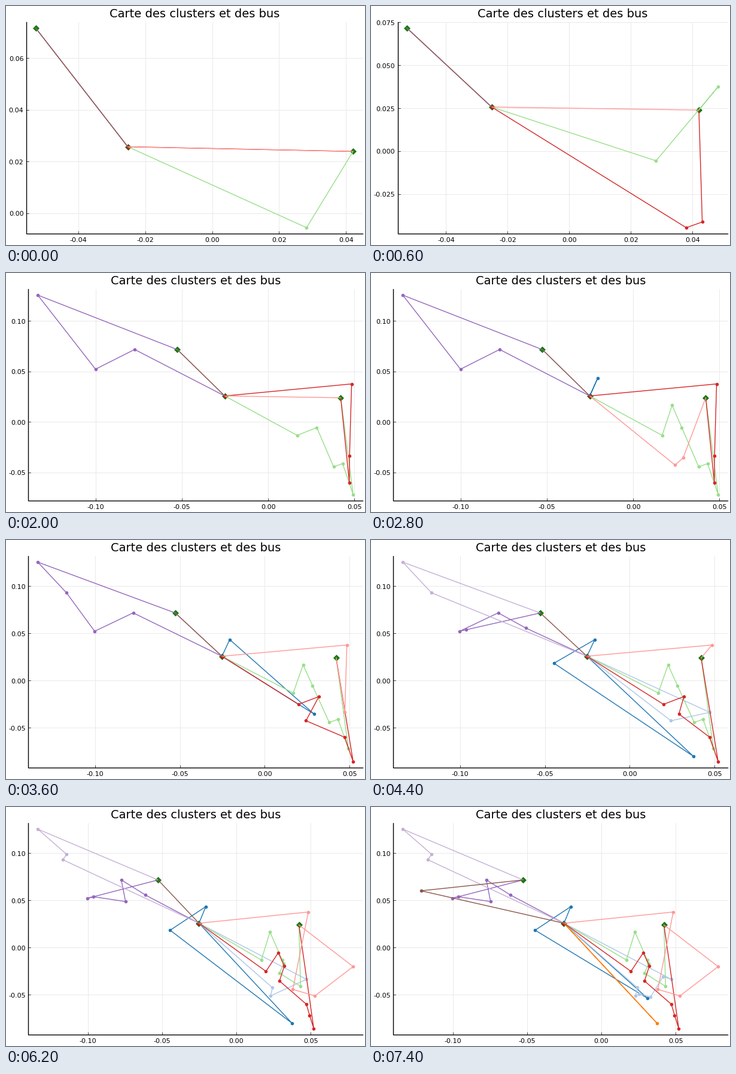
Recreate the animation shown at these times as a matplotlib script. Size 600 px wide and 400 px high, loop 8000 ms.

```python
import math
import matplotlib.pyplot as plt
from matplotlib.animation import FuncAnimation

W, H, DPI = 600, 400, 100
FRAMES, INTERVAL = 40, 200
TOP, BOTTOM, RIGHT = 27, 381, 596
PT = 72 / DPI

# A and B are depots, S is the school, the rest are bus stops.
PLACES = {
    "A": (-.0527, .0716), "S": (-.0252, .0257), "B": (.0421, .0239),
    "C": (.0282, -.0056), "D": (.0484, .0376), "E": (.0380, -.0445),
    "F": (.0432, -.0412), "G": (-.1337, .1255), "H": (-.0775, .0717),
    "I": (.0471, -.0602), "J": (-.1002, .0522), "K": (-.0206, .0433),
    "L": (.0168, -.0133), "M": (.0226, .0165), "N": (.0243, -.0427),
    "O": (.0290, -.0355), "P": (.0472, -.0338), "Q": (.0493, -.0720),
    "R": (.0199, -.0253), "T": (.0319, -.0171), "U": (.0521, -.0861),
    "V": (-.1168, .0930), "W": (-.1143, .0988), "X": (-.0963, .0538),
    "Y": (-.0611, .0555), "Z": (-.0446, .0183), "a": (.0375, -.0804),
    "b": (.0308, -.0133), "c": (.0290, -.0272), "d": (-.0746, .0487),
    "e": (-.1214, .0601), "f": (.0310, -.0538), "g": (.0415, -.0309),
    "h": (.0331, -.0525), "i": (.0255, -.0494), "j": (.0230, -.0513),
    "k": (.0323, -.0196), "l": (.0529, -.0513), "m": (.0786, -.0203),
}

# Bus: colour, start, end.
BUSES = {
    "blue": ("#1f77b4", "S", "S"),
    "sky": ("#aec7e8", "S", "S"),
    "orange": ("#ff7f0e", "S", "S"),
    "green": ("#98df8a", "S", "B"),
    "red": ("#d62728", "S", "B"),
    "pink": ("#ff9896", "S", "B"),
    "purple": ("#9467bd", "A", "S"),
    "lilac": ("#c5b0d5", "A", "S"),
    "brown": ("#8c564b", "A", "S"),
}

# Routes that change when a new stop is added.
CHANGES = {
    0: dict(green="C"),
    1: dict(green="CD"),
    2: dict(red="E"),
    3: dict(red="EF"),
    4: dict(purple="H"),
    5: dict(red="EFI"),
    6: dict(purple="GH"),
    7: dict(green="LCD"),
    8: dict(purple="GJH"),
    9: dict(green="LCEF", red="DPI"),
    10: dict(green="LCEFQ"),
    11: dict(pink="N"),
    12: dict(blue="K"),
    13: dict(green="LMCEFQ"),
    14: dict(pink="NO"),
    15: dict(blue="KO", red="NIU", pink="DP"),
    16: dict(red="RNIU"),
    17: dict(red="RTNIU"),
    18: dict(purple="GVJH"),
    19: dict(purple="GVXJH"),
    20: dict(purple="XJHY", lilac="GV"),
    21: dict(blue="KZO"),
    22: dict(blue="KZa", sky="NP", red="RTOIU", pink="D"),
    23: dict(green="LMbTF", red="RCOIQU", pink="DE"),
    24: dict(green="LMbTcF"),
    25: dict(lilac="GWV"),
    27: dict(pink="DEl"),
    28: dict(purple="JXdHY"),
    29: dict(pink="DElm"),
    30: dict(sky="PjN"),
    31: dict(red="RCkOIQU"),
    32: dict(brown="e"),
    34: dict(sky="PijN"),
    35: dict(sky="PhijN"),
    36: dict(sky="PghijN"),
    37: dict(blue="KZf", orange="a"),
}

plt.rcParams["font.family"] = "DejaVu Sans"
fig = plt.figure(figsize=(W / DPI, H / DPI), dpi=DPI, facecolor="white")
ax = fig.add_axes([0, 0, 1, 1])


def routes_at(step):
    routes = dict.fromkeys(BUSES, "")
    for when, change in CHANGES.items():
        if when <= step:
            routes.update(change)
    return routes


def limits(values):
    low, high = min(values), max(values)
    pad = .03 * (high - low)
    return low - pad, high + pad


def ticks(low, high):
    span = high - low
    step = .02 if span < .11 else .025 if span < .17 else .05
    digits = 3 if step == .025 else 2
    first, last = math.ceil(low / step), math.floor(high / step)
    return [(k * step, f"{k * step:.{digits}f}") for k in range(first, last + 1)]


def line(xs, ys, color="black", px=1.4, **style):
    ax.plot(xs, ys, color=color, lw=px * PT, **style)


def marker(spot, shape, color, size, edge="none"):
    ax.plot(*spot, shape, color=color, ms=size * PT, mec=edge, mew=.5 * PT)


def draw(step):
    ax.cla()
    ax.set(xlim=(0, W), ylim=(H, 0))
    ax.axis("off")

    routes = routes_at(step)
    used = set("ASB" + "".join(routes.values()))
    x0, x1 = limits([PLACES[p][0] for p in used])
    y0, y1 = limits([PLACES[p][1] for p in used])
    x_ticks, y_ticks = ticks(x0, x1), ticks(y0, y1)

    # The left margin follows the widest label.
    widest = max((text for _, text in y_ticks), key=len)
    left = 33.8 + 3.5 * widest.startswith("-") + 7.2 * (len(widest.lstrip("-")) - 4)

    def px(x):
        return left + (x - x0) / (x1 - x0) * (RIGHT - left)

    def py(y):
        return BOTTOM - (y - y0) / (y1 - y0) * (BOTTOM - TOP)

    # Straight lines snap to whole pixels when drawn.
    for value, text in x_ticks:
        x = px(value)
        line([x, x], [TOP, BOTTOM], "#e9e9e9", 1)
        line([x, x], [BOTTOM - 4, BOTTOM], px=.7)
        ax.text(x, 395, text, size=8, ha="center", va="baseline")
    for value, text in y_ticks:
        y = py(value)
        line([left, RIGHT], [y, y], "#e9e9e9", 1)
        line([left, left + 4], [y, y], px=.7)
        ax.text(left - 4.3, y + 4.5, text, size=8, ha="right", va="baseline")
    line([left, left, RIGHT], [TOP, BOTTOM, BOTTOM],
         solid_joinstyle="miter", solid_capstyle="projecting")
    ax.text((left + RIGHT) / 2 + .3, 19, "Carte des clusters et des bus",
            size=14, ha="center", va="baseline")

    spots = {p: (px(PLACES[p][0]), py(PLACES[p][1])) for p in used}
    for depot in "ABS":
        marker(spots[depot], "D", "#008000", 6.4, "#005000")
    marker(spots["S"], "o", "#f00000", 6.2)

    for bus, stops in routes.items():
        color, start, end = BUSES[bus]
        # Loops without stops stay hidden.
        if start == end and not stops:
            continue
        xs, ys = zip(*(spots[p] for p in start + stops + end))
        line(xs, ys, color, marker="o", ms=5.6 * PT, mew=0,
             markevery=list(range(1, len(stops) + 1)))


anim = FuncAnimation(fig, draw, frames=FRAMES, interval=INTERVAL,
                     init_func=lambda: None, repeat=True, repeat_delay=0)
plt.show()
```
